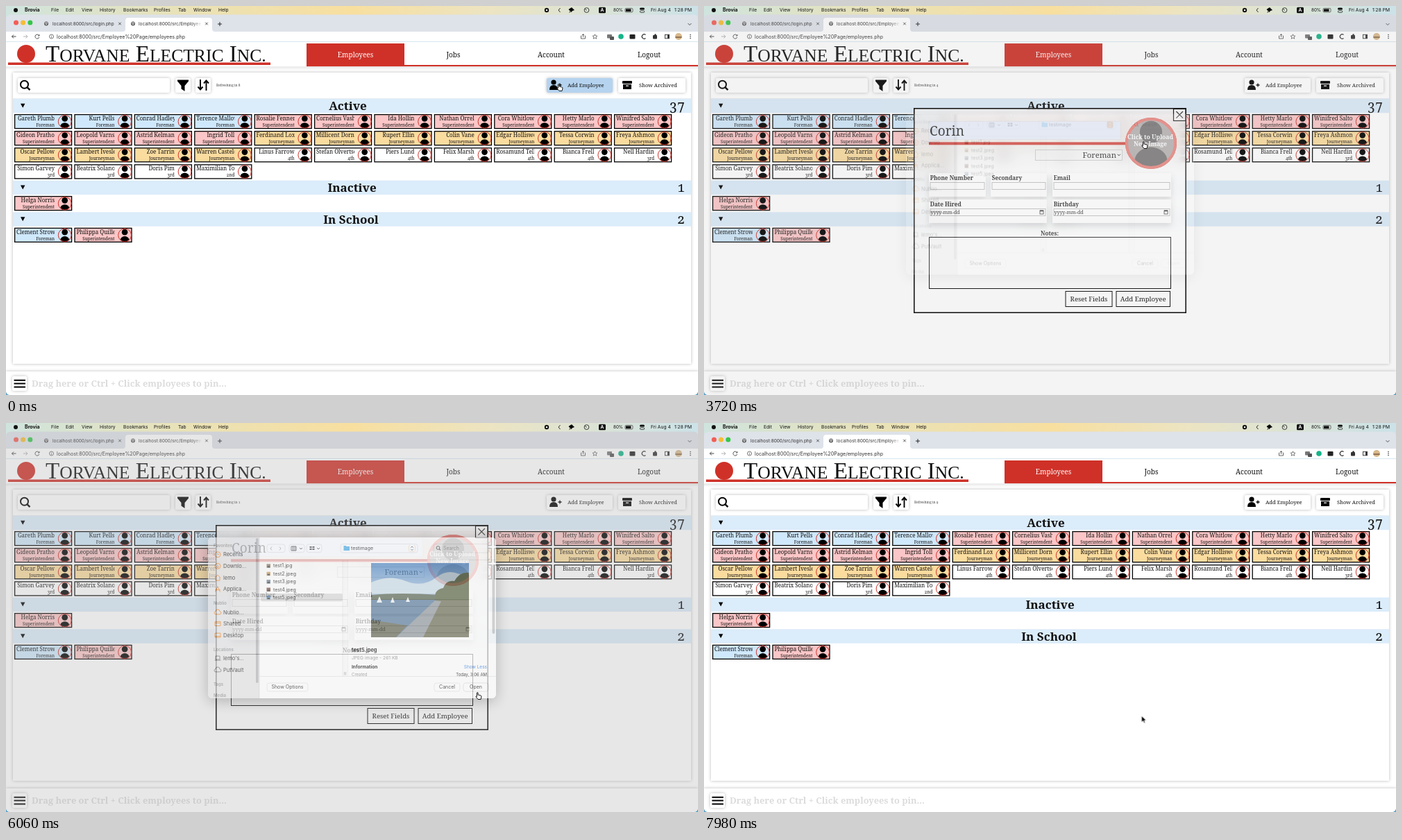
An HTML page that plays this animation: 997x561 px, repeating every 8 s.

```html
<!DOCTYPE html>
<html lang="en">
<head>
<meta charset="utf-8">
<title>Employees</title>
<style>
html, body { margin: 0; width: 100%; height: 100%; overflow: hidden; background: #5da2c8; }
svg { position: absolute; left: 0; top: 0; overflow: hidden; font-family: Inter, "Liberation Sans", sans-serif; }
text { white-space: pre; }
.g { font-family: "Noto Serif", "Liberation Serif", serif; font-variant-numeric: oldstyle-nums; }
.t { font-family: "Liberation Serif", serif; }
.b { font-weight: 700; }
.m { text-anchor: middle; }
.e { text-anchor: end; }
.sh { filter: drop-shadow(0 0 2px rgba(0, 0, 0, .28)); }
.lift { filter: drop-shadow(0 4px 4px rgba(0, 0, 0, .16)); }
.line { fill: none; stroke: #000; }
#modal { position: absolute; left: 302px; top: 147px; width: 393px; height: 296px; opacity: 0;
  background: rgba(255, 255, 255, .8); backdrop-filter: blur(9px); }
</style>
</head>
<body>
<svg id="page" width="997" height="561"></svg>
<div id="modal"><svg id="form" width="393" height="296" viewBox="302 147 393 296"></svg></div>
<svg id="top" width="997" height="561"></svg>
<script>
const LOOP = 8000, RED = '#cf3128';
const BLUE = '#cfe8fb', PINK = '#fbc6c7', GOLD = '#fbdc9f', WHITE = '#fff';
const $ = id => document.getElementById(id);

// ---- drawing helpers ----
const text = (x, y, s, size, cls = '', fill = '#111') =>
  `<text x="${x}" y="${y}" font-size="${size}" class="${cls}" fill="${fill}">${s}</text>`;
const rect = (x, y, w, h, fill, more = '') =>
  `<rect x="${x}" y="${y}" width="${w}" height="${h}" fill="${fill}" ${more}/>`;
const disc = (x, y, r, fill, more = '') => `<circle cx="${x}" cy="${y}" r="${r}" fill="${fill}" ${more}/>`;
const path = (d, fill = '#000', more = '') => `<path d="${d}" fill="${fill}" ${more}/>`;
const line = (d, w = 1, color = '#000') => `<path d="${d}" class="line" style="stroke:${color};stroke-width:${w}"/>`;
const group = (id, body) => `<g id="${id}">${body}</g>`;
const button = (x, y, w, h) => rect(x, y, w, h, WHITE, 'rx="2" class="sh"');
const lens = (x, y, r, w, color) =>
  disc(x, y, r, 'none', `stroke="${color}" stroke-width="${w}"`) +
  line(`M${x + r * .7} ${y + r * .7}l${r * .75} ${r * .75}`, w * 1.2, color);

// Person badge, scaled from a unit circle
const badge = (x, y, r, ring, back, body = '#000', edge = RED) =>
  `<g transform="translate(${x} ${y}) scale(${r})">` + disc(0, 0, 1, back) +
  `<g clip-path="url(#unit)" fill="${body}"><circle cy="-.46" r=".46"/><ellipse cy=".76" rx=".68" ry=".6"/></g>` +
  disc(0, 0, 1, 'none', `stroke="${edge}" stroke-width="${ring / r}"`) + '</g>';

// ---- employee cards ----
const ACTIVE = [
  ['Foreman', BLUE, 'Gareth Plumb|Kurt Pells|Conrad Hadley|Terence Mallows'],
  ['Superintendent', PINK, 'Rosalie Fenner|Cornelius Vashley|Ida Hollin|Nathan Orrel|Cora Whitlow|Hetty Marlo|' +
    'Winifred Saltoun|Gideon Prathor|Leopold Varnsby|Astrid Kelman|Ingrid Toll'],
  ['Journeyman', GOLD, 'Ferdinand Loxeby|Millicent Dorn|Rupert Ellin|Colin Vane|Edgar Holliswood|Tessa Corwin|' +
    'Freya Ashmont|Oscar Pellow|Lambert Ivesley|Zoe Tarrin|Warren Casteldo'],
  ['4th', WHITE, 'Linus Farrow|Stefan Olvertson|Piers Lund|Felix Marsh|Rosamund Tell|Bianca Frell'],
  ['3rd', WHITE, 'Nell Hardin|Simon Garvey|Beatrix Solanora|Doris Pim'],
  ['2nd', WHITE, 'Maximilian Tovey']];
const INACTIVE = [['Superintendent', PINK, 'Helga Norris']];
const SCHOOL = [['Foreman', BLUE, 'Clement Strowger'], ['Superintendent', PINK, 'Philippa Quilley']];

const pen = document.createElement('canvas').getContext('2d');
pen.font = '8px "Noto Serif", "Liberation Serif", serif';

const card = (x, y, name, role, fill) => {
  const wide = pen.measureText(name).width > 56;
  return rect(x + .6, y + .6, 82, 20, fill, 'stroke="#000" stroke-width="1.3"') +
    `<svg x="${x + 2}" y="${y}" width="56" height="21">` +
    text(wide ? 1 : 56, 9, name, 8, wide ? 'g' : 'g e') + text(56, 18, role, 6.2, 'g e') + '</svg>' +
    badge(x + 72.7, y + 10.7, 9.4, 1, fill);
};
const cards = (y, groups) => groups
  .flatMap(([role, fill, names]) => names.split('|').map(n => [n, role, fill]))
  .map((c, i) => card(12 + i % 11 * 86.4, y + Math.floor(i / 11) * 24.1, ...c)).join('');

const band = (y, x, title, count) =>
  rect(10, y, 977, 20.5, '#dbecfa') + path(`M21 ${y + 7}h6.4l-3.2 6z`) +
  text(x, y + 16.2, title, 17, 'g b m') + text(978, y + 16.5, count, 19, 'g e');

// ---- browser frame ----
const menu = () => {
  const items = { 65: 'File', 86: 'Edit', 109: 'View', 135: 'History', 169: 'Bookmarks', 213: 'Profiles',
    248: 'Tab', 270: 'Window', 306: 'Help' };
  return rect(0, 0, 997, 20, 'url(#sky)') + disc(14, 6, 3, '#111') + text(27, 8.4, 'Brovia', 7, 'b') +
    Object.entries(items).map(([x, s]) => text(x, 8.4, s, 6.7)).join('') +
    disc(779, 6, 3.2, '#111') + rect(777.9, 4.9, 2.2, 2.2, WHITE) + line('M798.5 3l-2.5 3 2.5 3', .8) +
    path('M815 2l4 4-3 1-1.5 2-4-4 2-1.5zM813 7l-2 3 3-2z') +
    disc(836.5, 6, 3.4, 'none', 'stroke="#111" stroke-width=".8"') + line('M836.5 6l-2-1.5', .9) +
    rect(854, 1.8, 10, 8.5, '#111', 'rx="1.5"') + text(859, 8.4, 'A', 6.5, 'b m', '#fff') +
    text(875, 8.4, '80%', 6.3) + rect(892, 3.3, 11, 5.6, 'none', 'rx="1.5" stroke="#333" stroke-width=".7"') +
    rect(893, 4.3, 7.5, 3.6, '#111') + rect(913, 2.5, 7, 3, '#111', 'rx="1.5"') +
    rect(913.4, 6.8, 6.4, 2.6, 'none', 'rx="1.3" stroke="#111" stroke-width=".7"') +
    text(929, 8.4, 'Fri Aug 4', 6.7) + text(988, 8.4, '1:28 PM', 6.7, 'e');
};
const cross = (x, y, r, w = .8) => line(`M${x - r} ${y - r}l${2 * r} ${2 * r}m0 ${-2 * r}l${-2 * r} ${2 * r}`, w, '#333');
const globe = x => disc(x, 25.5, 3, '#666') + line(`M${x - 2} 24.5h4m-3 2h2`, .8, WHITE);
const tabs = () =>
  rect(0, 12, 997, 26, '#dee2e9') + disc(14.5, 24, 3.5, '#f25e56') + disc(24.6, 24, 3.5, '#f5bd35') + disc(34.8, 24, 3.5, '#35c649') +
  globe(58) + text(67, 28, 'localhost:8000/src/login.php', 6.5, '', '#333') + cross(164, 25.5, 1.8) +
  path('M168 37q4 0 4-4v-12q0-4 4-4h117q4 0 4 4v12q0 4 4 4z', WHITE) + globe(183) +
  '<svg x="191" y="17" width="90" height="18">' + text(0, 11, 'localhost:8000/src/Employee Page', 6.5, '', '#333') + '</svg>' +
  rect(268, 19, 14, 15, 'url(#fade)') + cross(289, 25.5, 1.8) + line('M305 26h6m-3-3v6', .8) + line('M982.5 25l2.5 2.5 2.5-2.5', .9, '#444') +
  rect(0, 37, 997, 14.5, WHITE) + line('M14.5 44h-6m2.5-2.5l-2.5 2.5 2.5 2.5', .9, '#333') +
  line('M25 44h6m-2.5-2.5l2.5 2.5-2.5 2.5', .9, '#aaa') + line('M47.5 42.5a3 3 0 1 0 .3 2.5M48 41v2h-2', .9, '#444') +
  disc(65.5, 44, 3, 'none', 'stroke="#555" stroke-width=".8"') + line('M65.5 42.3v.8m0 .7v2', .8, '#555') +
  text(73, 46.6, 'localhost:8000/src/Employee%20Page/employees.php', 7.1, '', '#333') +
  line('M829.5 43h-1v4h6v-4h-1M831.5 45v-4.5m-1.5 1.5l1.5-1.5 1.5 1.5', .8, '#444') +
  path('M848.5 40.8l1 2.2 2.4.2-1.8 1.6.6 2.4-2.2-1.3-2.2 1.3.6-2.4-1.8-1.6 2.4-.2z', 'none', 'stroke="#444" stroke-width=".7"') +
  rect(866, 41, 7, 5.5, '#777', 'rx="1"') + rect(870, 44, 6, 5, '#555', 'rx="1"') + disc(886, 44, 3.8, '#15b488') +
  rect(898.5, 41, 8, 6.5, '#222', 'rx="1"') + line('M921.5 41.5a3.2 3.2 0 1 0 0 5', 1.2, '#333') +
  rect(932, 42, 6, 5.5, '#333', 'rx="1"') + disc(935.5, 41.5, 1.2, '#333') +
  rect(949.5, 41.3, 6, 5.5, 'none', 'stroke="#333" stroke-width=".9"') + rect(953, 41.3, 2.5, 5.5, '#333') +
  disc(969, 44, 5, '#d8b88c') + rect(964.5, 44, 9, 2, '#8f7352') + [41.5, 44, 46.5].map(y => disc(986, y, .8, '#333')).join('');

// ---- main page ----
const caps = (big, small) => `<tspan font-size="33">${big}</tspan><tspan font-size="25.6">${small}</tspan>`;
const adder = (x, y) => disc(x - 2, y - 4, 3.6, '#000') + path(`M${x - 8} ${y + 7}q0-7 6-7t6 7z`) + line(`M${x + 4.5} ${y}h5m-2.5-2.5v5`, 1.3);
const TICKS = [0, 60, 990, 1920, 2850, 3780, 4710, 5640, 6570, 7500, LOOP];
const count = i => i < 8 ? 8 - i : 18 - i;

const header = () =>
  rect(0, 51.5, 997, 510, WHITE) + disc(29, 69, 13, RED) + rect(3, 81.5, 378, 3.5, RED) +
  text(57, 80, caps('T', 'ORVANE') + caps(' E', 'LECTRIC') + caps(' I', 'NC.'), 33, 't') +
  rect(433, 85, 564, 2.3, RED) + rect(433, 54, 141, 32, RED) +
  ['Employees', 'Jobs', 'Account', 'Logout'].map((s, i) => text(503.5 + 141 * i, 74, s, 10, 'g m', i ? '#111' : WHITE)).join('') +
  rect(0, 87.3, 997, 5, 'url(#drop)');

const toolbar = () =>
  button(17, 104, 219, 21) + lens(26.5, 113.2, 5.5, 2, '#000') +
  button(244, 104, 22, 21) + path('M247 106.5h16v2l-5.5 6.5v8l-5-3.5v-4.5l-5.5-6.5z') +
  button(273, 104, 22, 21) + line('M280 106v14m-3.5-3.5l3.5 4 3.5-4M288.5 122v-14m-3.5 3.5l3.5-4 3.5 4', 1.9) +
  TICKS.slice(0, -1).map((_, i) => group('tick' + i, text(303, 116, 'Refreshing in ' + count(i), 4.8, 'g', '#444'))).join('') +
  button(779, 104, 95, 21) + group('addHover', rect(779, 104, 95, 21, '#b5d3ef', 'rx="2"')) +
  adder(791, 114) + text(809, 117.2, 'Add Employee', 7.7, 'g') +
  button(882, 104, 97, 21) + rect(888, 108, 14, 4, '#000', 'rx="1"') + path('M889 113h12v7h-12z') + rect(893, 114.5, 4, 1.3, WHITE) +
  text(912, 117.2, 'Show Archived', 7.6, 'g');

const footer = () =>
  rect(0, 527, 997, 34, WHITE, 'class="sh"') + button(9, 534, 21, 21) +
  line('M11.5 539.8h16.5m-16.5 4.8h16.5m-16.5 4.8h16.5', 2) +
  text(37, 549, 'Drag here or Ctrl + Click employees to pin...', 12.8, 'g b', '#dcdcdc');

const defs = `<defs>
  <clipPath id="unit"><circle r="1"/></clipPath>
  <clipPath id="win"><rect y="12.5" width="997" height="548.5" rx="6"/></clipPath>
  <clipPath id="sheetClip"><rect x="291" y="171" width="415" height="232" rx="6"/></clipPath>
  <linearGradient id="sky"><stop stop-color="#cfe4de"/><stop offset=".25" stop-color="#e9e2b8"/><stop offset=".5" stop-color="#f8df9f"/><stop offset=".7" stop-color="#ece4c2"/><stop offset="1" stop-color="#cbe2e8"/></linearGradient>
  <linearGradient id="fade"><stop stop-color="#fff" stop-opacity="0"/><stop offset="1" stop-color="#fff"/></linearGradient>
  <linearGradient id="drop" x2="0" y2="1"><stop stop-color="#e6e6e6"/><stop offset="1" stop-color="#fff"/></linearGradient>
  <linearGradient id="air" x2="0" y2="1"><stop stop-color="#4f88c8"/><stop offset="1" stop-color="#c3d8e6"/></linearGradient>
</defs>`;

$('page').innerHTML = defs + menu() + '<g clip-path="url(#win)">' + tabs() + header() +
  rect(10, 96, 977, 420, WHITE, 'class="sh"') + toolbar() + rect(10, 133, 977, 1, '#eee') +
  band(133.7, 492.5, 'Active', 37) + cards(156, ACTIVE) +
  band(251.6, 498.5, 'Inactive', 1) + cards(274, INACTIVE) +
  band(297.3, 497, 'In School', 2) + cards(319.8, SCHOOL) + footer() + '</g>';

// ---- add-employee form ----
const field = (x, y, w, label, hint) =>
  rect(x, y, w, 34, WHITE, 'class="lift"') + text(x + 1.7, y + 10, label, 8.2, 'g b') +
  rect(x + 2, y + 13.5, w - 4, 10, WHITE, 'stroke="#aaa" stroke-width=".8"') +
  (hint ? text(x + 2.5, y + 20.7, hint, 7, 'g') +
    rect(x + w - 10, y + 16, 5, 5, 'none', 'stroke="#222" stroke-width=".8"') + rect(x + w - 10, y + 15.6, 5, 1.6, '#222') : '');
const box = (x, w, s) => rect(x + .5, 411.5, w, 22, WHITE, 'stroke="#000"') + text(x + w / 2 + .5, 426, s, 9.6, 'g m');
const caption = (a, b) => text(643, 191.5, a, 8.6, 'g b m', WHITE) + text(643, 201.8, b, 8.6, 'g b m', WHITE);

$('form').innerHTML =
  rect(324, 166.5, 276, 26, 'rgba(255,255,255,.25)', 'stroke="#ccc" stroke-width=".6"') +
  group('hint', text(325, 186.8, 'Name', 19, 'g', '#757575')) +
  group('focus', rect(324, 166.5, 276, 26, 'none', 'rx="1" stroke="#e8a568" stroke-width="1.2"')) +
  group('value', rect(324, 166.5, 276, 26, '#e6eefc') + text(325, 186.8, 'Corin', 19, 'g')) +
  rect(324, 196.3, 290, 4, RED) +
  rect(477.5, 207.5, 125, 15, 'rgba(245,245,245,.6)', 'stroke="#bbb" stroke-width=".8"') +
  text(594, 219, 'Foreman', 11.3, 'g e') + line('M595.8 213.8l2 2 2-2', 1) +
  badge(644, 198, 35, 4, WHITE) +
  group('upload', badge(644, 198, 35, 4, '#aaa5a5', '#626060', '#e5736c') + caption('Click to Upload', 'New Image')) +
  group('done', badge(644, 198, 35, 4, '#cd4b44', '#bf605b') + caption('Image', 'Uploaded')) +
  field(324, 241, 82, 'Phone Number') + field(413, 241, 81, 'Secondary') + field(502, 241, 171, 'Email') +
  field(324, 279, 170, 'Date Hired', 'yyyy-mm-dd') + field(502, 279, 171, 'Birthday', 'yyyy-mm-dd') +
  text(498, 331, 'Notes:', 8.2, 'g b m') + rect(324.5, 333.5, 348, 74, WHITE, 'stroke="#000"') +
  box(520.5, 67, 'Reset Fields') + box(593.5, 77.5, 'Add Employee') +
  group('green', rect(594.5, 412, 76.5, 21, '#b6f6ba') + text(632.7, 426, 'Add Employee', 9.6, 'g m')) +
  rect(302.8, 147.8, 391.4, 294.4, 'none', 'stroke="#000" stroke-width="1.6"') +
  rect(676.5, 148.5, 17.5, 17, 'rgba(255,255,255,.5)', 'stroke="#000" stroke-width="1.2"') + cross(685.2, 156.8, 4.8, 1.3) +
  group('suggest', rect(375, 197, 81, 42, WHITE, 'rx="2" class="sh"') + rect(375, 200, 81, 18, '#f6f6f6') +
    text(381, 211.3, 'Corin', 7) + text(381, 230, 'Lorn', 7));

// ---- file sheet ----
const ORANGE = '#ef8a2c', GRAY = '#777';
const heading = (y, s) => text(299, y, s, 6, 'b', '#999');
const place = (y, s, icon, color = ORANGE) =>
  `<g transform="translate(305 ${y - 2.6})">` + line(icon, 1, color) + '</g>' + text(313, y, s, 7.5, '', '#222');
const RING = 'M-4 0a4 4 0 1 0 8 0a4 4 0 1 0-8 0', CLOUD = 'M-3 3a2 2 0 0 1 0-4a3 3 0 0 1 6 0a2 2 0 0 1 0 4z', FLAT = 'M-4-3h8v6h-8z';
const sidebar = () =>
  rect(291, 171, 74, 232, '#e5e5e7') + rect(364.5, 171, .8, 232, '#d2d2d4') + rect(360, 172, 3.6, 209, '#b5b5b7', 'rx="1.8"') +
  heading(185, 'Favorites') + place(198.3, 'Recents', RING + 'M0-2v2h2') + place(215, 'Downlo...', RING + 'M0-2v4m-2-1.5l2 2 2-2') +
  place(231.7, 'lemo', 'M-4 0l4-4 4 4M-3-1v5h6v-5') + place(248.3, 'Applica...', 'M-3.5 4l3.5-8 3.5 8M-4 1h8') +
  heading(268, 'Nublio') + place(281.5, 'Nublio...', CLOUD) + place(298, 'Shared', FLAT + 'M-4-1h8') + place(314.7, 'Desktop', FLAT + 'M-4 1.5h8') +
  heading(334.5, 'Locations') + place(347.7, "lemo's...", 'M-3-3h6v5h-6zM-4.5 3h9', GRAY) + place(364.5, 'PutVault', CLOUD, GRAY) +
  heading(384.5, 'Tags') + heading(401, 'Media');
const frame = (x, y, w, h) => rect(x, y, w, h, WHITE, 'rx="3" stroke="#ddd" stroke-width=".7"');
const pill = (x, w, s, color = '#222') => frame(x, 381, w, 12) + text(x + w / 2, 389.4, s, 7, 'm', color);
const stepper = (fill, color) => rect(580.5, 182, 9, 9.5, fill, 'rx="2"') +
  line('M583.3 185.7l1.7-1.7 1.7 1.7m0 2.2l-1.7 1.7-1.7-1.7', .9, color);
const files = () => ['test1.jpg', 'test2.jpeg', 'test3.jpeg', 'test4.jpeg', 'test5.jpeg'].map((s, i) => {
  const y = 214.3 + 11.4 * i;
  return rect(375.5, y - 5, 5.5, 5.5, ['#8a7a66', '#c99b5e', '#6b7f90', '#7a4a3a', '#5f8fc0'][i]) + rect(376.5, y - 2, 3.5, 2, '#333') + text(385, y, s, 7, '', '#222');
}).join('');
const photo = () => '<svg x="526" y="208" width="141" height="107" viewBox="0 0 141 107">' +
  rect(0, 0, 141, 60, 'url(#air)') + path('M0 28q25-12 50-2t45-6 46 4v20H0z', '#cbdde8') +
  rect(0, 50, 141, 57, '#56799c') + path('M0 46q40-4 100 0v7H0z', '#55634f') +
  path('M92 54q-2-16 12-18 4-12 16-10 8-14 21-12v40z', '#56603f') + path('M60 107l34-53h47v53z', '#6a6a52') +
  path('M36 107l56-53 9 1-26 52z', '#8e969c') + path('M0 107V82l52 8-16 17z', '#5f6350') +
  path('M8 57l4-9 4 9zM28 57l3-8 3 8zM50 56l3-7 3 7z', '#eef2f4') + '</svg>';
const preview = () => rect(493, 204, 213, 167, WHITE) + rect(367, 252, 118, 11.2, '#d9d9d9', 'rx="2"') + photo() +
  text(498, 336, 'test5.jpeg', 7.4, 'b') + text(498, 347, 'JPEG image - 261 KB', 6.7, '', '#888') + text(498, 359.6, 'Information', 6.6, 'b') +
  text(693, 359.6, 'Show Less', 6.5, 'e', '#2a7de1') + text(498, 370.5, 'Created', 6, '', '#888') + text(693, 370.5, 'Today, 3:06 AM', 6, 'e') +
  rect(700.5, 210, 3.8, 100, '#c4c4c4', 'rx="1.9"') + pill(659, 36, 'Open');
const sheet = () => rect(291, 171, 415, 232, WHITE, 'rx="6" style="filter:drop-shadow(0 4px 10px rgba(0,0,0,.35))"') +
  '<g clip-path="url(#sheetClip)">' + rect(365, 171, 341, 232, WHITE) + sidebar() +
  frame(376, 181, 26, 11.5) + line('M383 184.5l-2 2.5 2 2.5M394 184.5l2 2.5-2 2.5', .8, '#999') +
  [408, 433].map(x => frame(x, 181, 22, 11.5) + line(`M${x + 15} 186l2 2 2-2`, .9, '#444')).join('') +
  line('M411 184h7v6h-7zM413.5 184v6m2.5-6v6', .9, '#444') + line('M437.5 185h3m1 0h3m-7 3h3m1 0h3', 2, '#444') +
  frame(482, 180.5, 111, 12.5) + path('M486.5 183h3l1 1h4.5v6h-8.5z', '#4fb0e8') + text(497, 189, 'testimage', 6.9, '', '#222') +
  stepper(ORANGE, WHITE) + group('idle', stepper(WHITE, '#555')) +
  frame(616, 180.5, 80, 12.5) + lens(622.5, 186, 2.4, .9, '#555') + text(630, 189.2, 'Search', 6.9, '', '#aaa') +
  rect(365, 203, 341, .8, '#e2e2e2') + rect(365, 371.2, 341, .8, '#e2e2e2') +
  [485, 612].map(x => rect(x, 203.5, 8, 168, '#fafafa', 'stroke="#e3e3e3" stroke-width=".7"')).join('') + line('M487.5 365v4.5m2-4.5v4.5', .6, '#888') +
  pill(376, 59, 'Show Options') + pill(617, 37, 'Cancel') + pill(659, 36, 'Open', '#bbb') +
  group('picked', preview()) + files() + '</g>';

const arrow = path('M0 0v9l2.2-2 1.5 3.3 1.5-.7-1.5-3.1h3z', '#000', 'stroke="#fff" stroke-width=".7"');
const hand = path('M1.5 1q1-1 1.6 0v3l4 1q1 .5.8 2l-.9 3.5h-4L0 6.8q0-1.3 1.5-.5z', '#fff', 'stroke="#000" stroke-width=".9"');
$('top').innerHTML = group('dim', rect(0, 12.5, 997, 548.5, 'rgb(174,174,174)', 'rx="6"')) + group('sheet', sheet()) +
  group('cursor', group('arrow', arrow) + group('hand', hand));

// ---- timeline: [ms, value] steps ----
const play = (id, prop, steps, easing = 'linear') => {
  const first = steps[0][0] ? [[0, steps[0][1]]] : [];
  const frames = [...first, ...steps, [LOOP, steps[steps.length - 1][1]]]
    .map(([t, v]) => ({ offset: t / LOOP, [prop]: v, easing }));
  $(id).animate(frames, { duration: LOOP, iterations: Infinity });
};
const fade = (id, ...steps) => play(id, 'opacity', steps);
const show = (id, ...spans) => {
  const steps = spans.flatMap(([a, b]) => b < LOOP ? [[a, 1], [b, 0]] : [[a, 1]]);
  play(id, 'opacity', steps[0][0] ? [[0, 0], ...steps] : steps, 'steps(1, end)');
};
const move = (id, easing, steps) =>
  play(id, 'transform', steps.map(([t, x, y]) => [t, `translate(${x}px, ${y}px)`]), easing);

TICKS.slice(0, -1).forEach((t, i) => show('tick' + i, [t, TICKS[i + 1]]));
show('addHover', [0, 570]);
fade('modal', [300, 0], [540, 1], [7650, 1], [7890, 0]);
show('hint', [0, 2250]);
show('focus', [1440, 2430]);
show('suggest', [1500, 2250]);
show('value', [2250, LOOP]);
fade('upload', [2970, 0], [3150, 1], [6330, 1], [6420, 0]);
fade('done', [6330, 0], [6420, 1]);
show('green', [7110, LOOP]);
show('picked', [4620, LOOP]);
show('idle', [5820, LOOP]);
fade('dim', [3570, 0], [3720, .14], [4080, .58], [5820, .58], [6060, .3], [6330, 0]);
fade('sheet', [3600, 0], [3720, .18], [3990, 1], [5820, 1], [6060, .66], [6330, 0]);
move('sheet', 'linear', [[3600, 0, -18], [3720, 0, -15.5], [3990, 0, 0], [5820, 0, 0], [6060, 0, -6], [6330, 0, -16]]);
show('hand', [0, 570], [2970, 3780], [5880, 7740]);
show('arrow', [570, 2970], [3780, 5880], [7740, LOOP]);
move('cursor', 'ease-in-out', [[0, 794, 112], [480, 794, 112], [1290, 400, 181], [1560, 400, 181], [1920, 399.5, 200.5],
  [2340, 399.5, 200.5], [3090, 631, 195], [3750, 631, 195], [4140, 465.5, 285], [4230, 465.5, 285], [4530, 402, 255],
  [4860, 402, 255], [5490, 677, 388], [6780, 677, 388], [7200, 633.5, 418.5], [7680, 633.5, 418.5], [7890, 630.5, 422.5]]);
</script>
</body>
</html>
```
